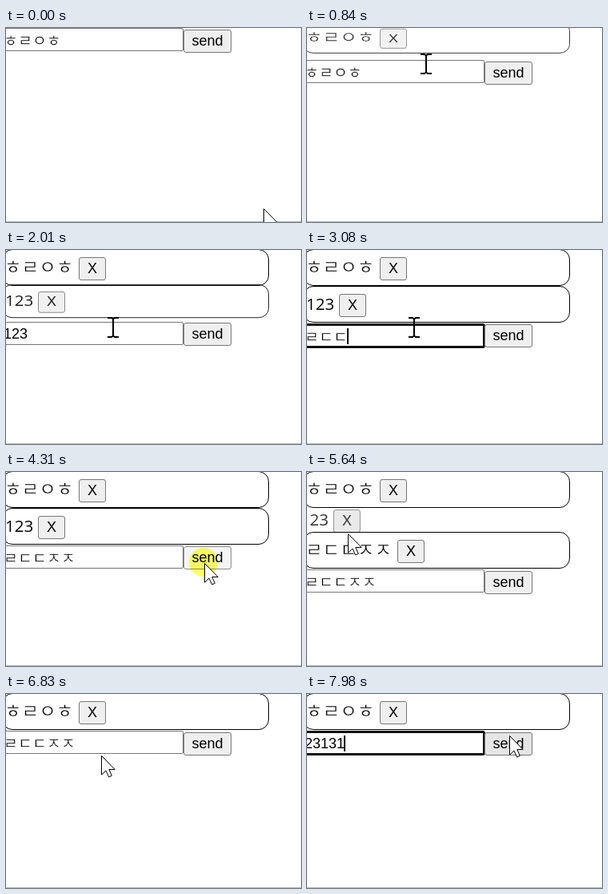
Recreate the animation shown at these times as an HTML page. Size 369 by 243 pixels, loop 8000 ms.

```html
<!DOCTYPE html>
<html lang="ko">
<head>
<meta charset="utf-8">
<title>Message list</title>
<style>
html, body { margin: 0; width: 100%; height: 100%; overflow: hidden; background: #fff; }
#stage { position: relative; width: 369px; height: 243px; overflow: hidden; color: #000; }
#stage * { position: absolute; box-sizing: border-box; white-space: pre; }
#stage #text { position: static; }
.item { left: -5px; top: 0; width: 334px; height: 46px; }
.frame { inset: 0; border: 1px solid #000; border-radius: 13px; }
.label { left: 4px; top: 0; font: 20.5px/45px "Open Sans", sans-serif; }
.ko { -webkit-text-stroke: .5px #fff; }
.label.ko { left: 3px; font: 23.5px/43px "Noto Sans CJK KR", "Noto Sans CJK", sans-serif; }
.btn { height: 29px; border: 1px solid #767676; border-radius: 3px; background: #efefef;
  font: 18px/27px "Liberation Sans", Arial, sans-serif; text-align: center; }
.btn.hover { background: #e5e5e5; }
.btn.active { background: #f5f5f5; border-color: #8d8d8d; }
.item .btn { top: 10px; width: 34px; }
#send { left: 222px; top: 0; width: 60px; }
#field { left: -6px; top: 0; width: 228px; height: 29px; border: 1px solid #767676; border-radius: 2px; }
#field.focus { top: 1px; outline: 3px solid #101010; outline-offset: -2px; }
#value { left: 2px; top: 0; font: 18px/28px "Liberation Sans", Arial, sans-serif; }
#value.ko { font: 19.5px/27px "Noto Sans CJK KR", "Noto Sans CJK", sans-serif; }
#caret { left: calc(100% - 1px); top: 4px; width: 2px; height: 20px; background: #000; }
#line { left: 0; top: 242px; width: 369px; height: 1px; background: #b8b8b8; }
#spot { left: -19px; top: -19px; width: 36px; height: 36px; border-radius: 50%;
  background: #ffff6b; mix-blend-mode: multiply; }
#arrow, #beam { left: 0; top: 0; overflow: visible; }
#beam { top: -1px; }
</style>
</head>
<body>
<div id="stage">
  <div id="line"></div>
  <div id="field"><div id="value"><span id="text"></span><i id="caret"></i></div></div>
  <div id="send" class="btn">send</div>
  <div id="spot"></div>
  <svg id="arrow" width="20" height="30">
    <path d="M.5 .5V24.2L6 19L9.6 27L13.3 25.4L9.8 17.5H17.2Z" fill="#fff" stroke="#000"/>
  </svg>
  <svg id="beam" width="16" height="26">
    <path d="M-7 -11H-2L0 -9.5L2 -11H7M0 -9.5V11.5M-7 13H-2L0 11.5L2 13H7" fill="none" stroke="#000" stroke-width="2"/>
  </svg>
</div>
<script>
const LOOP = 8000, ROW = 45.6, MOVE = 520, GLIDE = 330, PRESS = 110, FOCUS = 120;
const $ = id => document.getElementById(id);
const clamp = v => Math.min(1, Math.max(0, v));
const isKo = s => /[ㄱ-ㅎ]/.test(s);

// label, left edge of the delete button, enter time, leave time
const items = [
  ['ㅎㄹㅇㅎ', 91, 502, Infinity],
  ['123', 40, 1595, 5380],
  ['ㄹㄷㄷㅈㅈ', 113, 4410, 6190],
].map(([label, x, enter, leave]) => ({ x, enter, leave, ...makeItem(label, x) }));
const clicks = items.flatMap(it => [it.enter, it.leave]);

// word, time of the first key, time per key; a press on send ends the focus
const words = [['123', 1080, 80], ['ㄹㄷㄷㅈㅈ', 2790, 135], ['23131', 7480, 78]]
  .map(([word, start, step]) => {
    const next = items.find(it => it.enter > start);
    return { word, start, step, blur: next ? next.enter - PRESS : Infinity };
  });

// pointer stops: arrival time, x, y
const stops = [
  [0, 322, 226], [380, 250, 16], [840, 149, 45], [1480, 250, 64], [2010, 134, 97],
  [4200, 248, 114], [5270, 51, 77], [6060, 119, 77], [7250, 140, 62], [7970, 253, 52],
];

function add(parent, cls, text = '') {
  const el = document.createElement('div');
  el.className = cls;
  el.textContent = text;
  parent.append(el);
  return el;
}

function makeItem(label, x) {
  const el = document.createElement('div');
  el.className = 'item';
  $('stage').insertBefore(el, $('field'));
  const frame = add(el, 'frame');
  add(el, isKo(label) ? 'label ko' : 'label', label);
  const btn = add(el, 'btn', 'X');
  btn.style.left = x + 5 + 'px';
  return { el, frame, btn };
}

function pointerAt(t) {
  let [, x, y] = stops[0];
  for (const [at, tx, ty] of stops.slice(1)) {
    const u = clamp((t - at + GLIDE) / GLIDE), e = u * u * (3 - 2 * u);
    x += (tx - x) * e;
    y += (ty - y) * e;
  }
  return [Math.round(x), Math.round(y)];
}

function paintButton(btn, x, y, w, [px, py], down) {
  const over = px >= x && px < x + w && py >= y && py < y + 32;
  btn.classList.toggle('hover', over && !down);
  btn.classList.toggle('active', over && down);
}

function move(el, x, y) {
  el.style.transform = `translate(${x}px,${y}px)`;
}

function show(el, on) {
  el.style.display = on ? '' : 'none';
}

// Returns the height the item takes up in the list.
function paintItem(it, t, y, mouse, down) {
  const u = clamp((t - it.enter) / MOVE), rest = (1 - u) ** 2;
  const out = clamp((t - it.leave) / MOVE) ** 1.64;
  show(it.el, u > 0 && out < 1);
  const left = -22 * out;
  const top = Math.round(y - 1 - 85 * rest - ROW / 2 * out);
  it.el.style.transform = `translate(${left}px,${top}px) scaleY(${.6 + .4 * u})`;
  it.el.style.opacity = Math.sqrt(u) * (1 - out * (1 + out) / 2);
  it.frame.style.opacity = clamp(1 - out * 5);
  paintButton(it.btn, it.x + left, top + 10, 34, mouse, down);
  return ROW * (1 - rest) * (1 - out);
}

function paintField(t) {
  const w = words.findLast(w => t >= w.start - FOCUS);
  const focus = !!w && t < w.blur;
  const typed = words.findLast(w => t >= w.start);
  const text = typed
    ? typed.word.slice(0, 1 + Math.floor((t - typed.start) / typed.step))
    : 'ㅎㄹㅇㅎ';
  if ($('text').textContent !== text) $('text').textContent = text;
  $('value').classList.toggle('ko', isKo(text));
  $('field').classList.toggle('focus', focus);
  show($('caret'), focus);
}

function render(t) {
  const mouse = pointerAt(t), [mx, my] = mouse;
  const down = clicks.some(c => t >= c - PRESS && t < c);

  let y = 0;
  for (const it of items) y += paintItem(it, t, y, mouse, down);

  const fieldY = Math.round(y + .3), sendY = Math.round(y) + 2;
  move($('field'), 0, fieldY);
  move($('send'), 0, sendY);
  paintButton($('send'), 222, sendY, 60, mouse, down);
  paintField(t);

  const inField = mx < 222 && my >= fieldY && my < fieldY + 29;
  show($('arrow'), !inField);
  show($('beam'), inField);
  show($('spot'), down);
  for (const id of ['arrow', 'beam', 'spot']) move($(id), mx, my);
}

const start = performance.now();
function tick() {
  render((performance.now() - start) % LOOP);
  requestAnimationFrame(tick);
}
tick();
</script>
</body>
</html>
```
